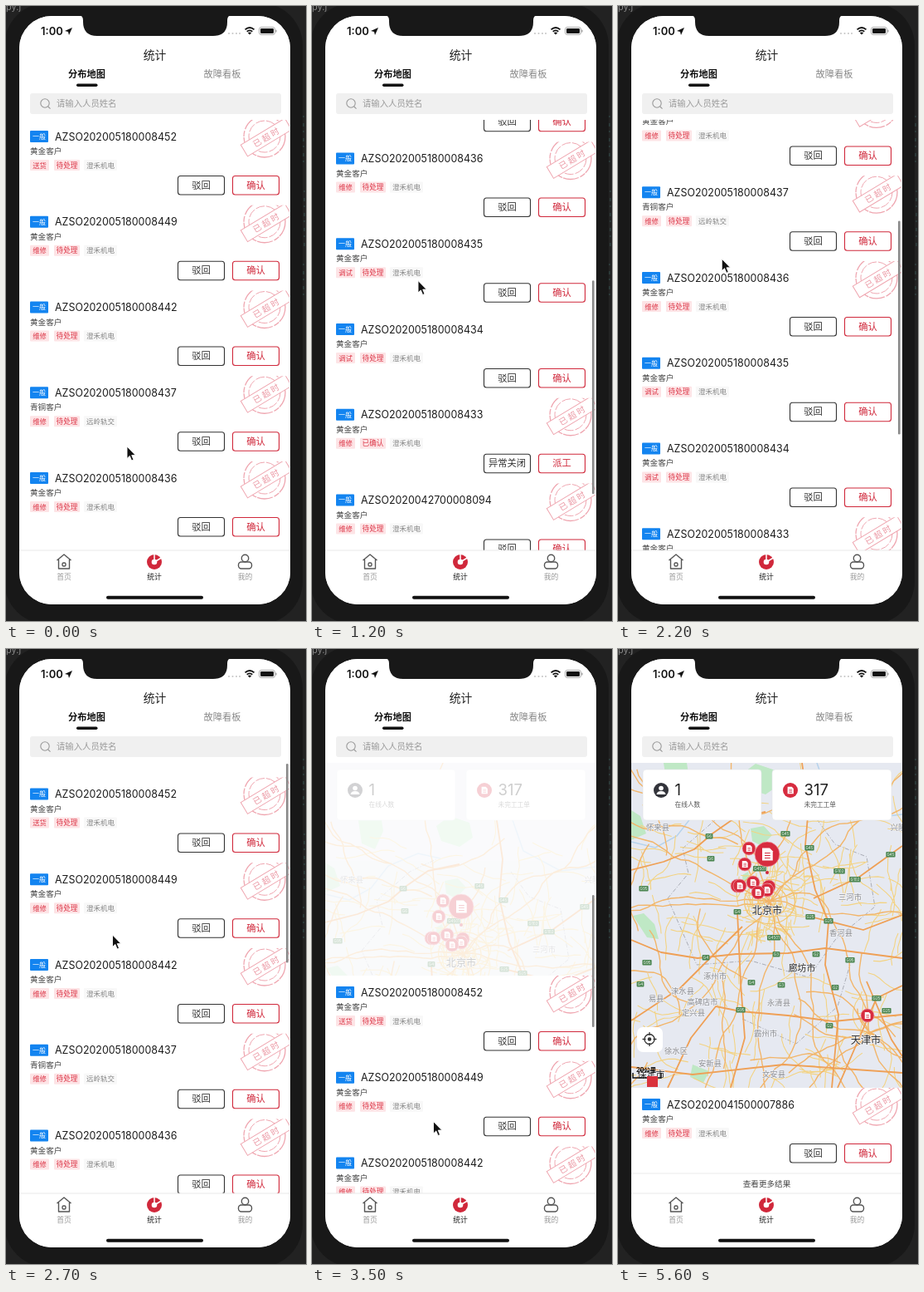
Animation of 362x740 px, one loop 5700 ms. Source, as an HTML page:

```html
<!DOCTYPE html>
<html lang="zh-CN">
<head>
<meta charset="utf-8">
<title>统计</title>
<style>
  html, body { margin: 0; width: 100%; height: 100%; overflow: hidden; background: #1d1d1d; }
  svg { display: block; width: 362px; height: 740px; font-family: Inter, "Noto Sans CJK SC", "Noto Sans CJK", sans-serif; }
</style>
</head>
<body>
<svg id="stage" viewBox="0 0 362 740"></svg>
<script>
const RED = '#d0283b', ROW = 102.75, LIST_TOP = 137, VIEW = 518;

// ---- drawing helpers: every one returns SVG markup ----
const text = (x, cy, size, str, fill = '#222', more = '') =>
  `<text x="${x}" y="${cy + size * .37}" font-size="${size}" fill="${fill}" ${more}>${str}</text>`;
const MID = 'text-anchor="middle"';
const rect = (x, y, w, h, fill, r = 0, more = '') =>
  `<rect x="${x}" y="${y}" width="${w}" height="${h}" rx="${r}" fill="${fill}" ${more}/>`;
const disc = (x, y, r, fill, more = '') => `<circle cx="${x}" cy="${y}" r="${r}" fill="${fill}" ${more}/>`;
const line = (d, stroke, w = 1, more = '') =>
  `<path d="${d}" fill="none" stroke="${stroke}" stroke-width="${w}" ${more}/>`;
const shape = (d, fill) => `<path d="${d}" fill="${fill}"/>`;
const clip = (id, x, y, w, h, r = 0) => `<clipPath id="${id}">${rect(x, y, w, h, '#000', r)}</clipPath>`;

let seed = 11;
const rnd = () => (seed = (seed * 16807) % 2147483647) / 2147483647;

// ---- order list ----
const orders = [
  ['05180008452', '送货'], ['05180008449'], ['05180008442'],
  ['05180008437', '维修', '青铜客户', '远岭轨交'], ['05180008436'],
  ['05180008435', '调试'], ['05180008434', '调试'], ['05180008433'],
  ['042700008094'], ['041500007886']
];

const stamp = () => `<g clip-path="url(#stampBox)"><g fill="none" stroke="#efa6b0">
  <circle cx="312" cy="20" r="25" stroke-width="1.3" stroke-dasharray="19 1 7 2"/>
  <circle cx="312" cy="20" r="19" stroke-dasharray="11 2"/></g>
  <g transform="translate(314 21) rotate(-31)">
  ${rect(-31, -8, 62, 16, '#fff', 0, 'stroke="#efa6b0"')}
  ${text(1, 0, 10, '已超时', '#eb96a2', MID + ' letter-spacing="2.5"')}</g></g>`;

const button = (x, str, color) => rect(x + .5, 67.5, 56, 22.5, '#fff', 3, `stroke="${color}" stroke-width="1.1"`)
  + text(x + 28.5, 78.5, 11.3, str, color, MID);

function order(i) {
  const [id, job = '维修', client = '黄金客户', firm = '澄禾机电'] = orders[i];
  const confirmed = i === 7;
  return (i === 5 || i === 6 ? '' : stamp())
    + rect(29, 13, 22, 14, '#1384f0', 1) + text(40, 20, 8, '一般', '#fff', MID)
    + text(59, 20, 12.45, 'AZSO2020' + id, '#1c1c1c')
    + text(29, 37.5, 9.6, client, '#444')
    + rect(29, 48, 23, 13, '#fde4e6', 1) + text(40.5, 54.5, 8.4, job, '#dc3546', MID)
    + rect(58, 48, 31, 13, '#fde4e6', 1) + text(73.5, 54.5, 8.6, confirmed ? '已确认' : '待处理', '#dc3546', MID)
    + rect(94, 48, 40, 13, '#f8f8f8', 1) + text(114, 54.5, 8.5, firm, '#858585', MID)
    + button(207, confirmed ? '异常关闭' : '驳回', '#333') + button(273, confirmed ? '派工' : '确认', RED);
}

// ---- map ----
function wander(x, y, angle, steps, stride) {
  let d = `M${x.toFixed(1)} ${y.toFixed(1)}`;
  for (let i = 0; i < steps; i++) {
    angle += (rnd() - .5) * .7;
    x += Math.cos(angle) * stride;
    y += Math.sin(angle) * stride;
    d += `L${x.toFixed(1)} ${y.toFixed(1)}`;
  }
  return d;
}
const compass = () => Math.floor(rnd() * 4) * Math.PI / 2 + .1;

function roads() {
  let minor = '', second = '', rings = '';
  for (let i = 0; i < 150; i++) minor += wander(16 + rnd() * 327, 170 + rnd() * 370, compass(), 4 + rnd() * 5, 8);
  for (let i = 0; i < 90; i++) minor += wander(140 + rnd() * 85, 265 + rnd() * 80, compass(), 4, 5);
  for (let i = 0; i < 14; i++) second += wander(183, 304, i * Math.PI / 7 + .15, 26, 10);
  for (let i = 0; i < 9; i++) second += wander(303, 462, i * Math.PI / 4.5, 11, 9);
  for (let i = 0; i < 16; i++) second += wander(16 + rnd() * 327, 190 + rnd() * 340, compass(), 14, 8);
  for (const r of [7, 13, 20, 29])
    rings += `<ellipse cx="183" cy="304" rx="${r * 1.05}" ry="${r * .92}" fill="none" stroke="#f3c670" stroke-width="1.3"/>`;
  const trunk = 'M16 266L55 256L92 241L114 222L140 204L178 196M16 350L52 365L96 372L143 367L205 366L250 360L343 372'
    + 'M222 137L230 190L226 236L238 290L254 328L250 380L266 440L258 528M343 237L290 275L236 300'
    + 'M16 447L75 408L112 371L150 334M60 528L88 468L118 430L148 436L205 441L260 448L343 440'
    + 'M343 405L312 420L285 482L265 528M136 528L153 468L148 402L144 316M16 503L90 512L200 500L343 510'
    + 'M343 320L296 338L232 322M300 400L330 470L343 490';
  return line(minor, '#f3d383', 1.1) + line(second, '#f2b56a', 1.4) + rings
    + line(trunk, '#efa056', 1.8, 'stroke-linejoin="round"');
}

const docIcon = (x, y, k) => `<g transform="translate(${x} ${y}) scale(${k})">
  ${shape('M-4 -5H2L4.5 -2.5V5H-4Z', '#fff')}${line('M-2 -1H2.5M-2 1H2.5M-2 3H2.5', RED, .8)}</g>`;
const pin = (x, y, r = 8) => disc(x, y, r, '#d72c3f', 'stroke="#ef9aa4" stroke-width=".7"') + docIcon(x, y, r / 10);

const towns = [['怀来县', 48, 215], ['兴隆', 338, 215], ['三河市', 280, 299], ['香河县', 269, 342], ['涿州市', 117, 394],
  ['涞水县', 78, 412], ['易县', 46, 421], ['高碑店市', 102, 425], ['定兴县', 91, 438], ['永清县', 194, 426],
  ['霸州市', 178, 463], ['徐水区', 70, 484], ['安新县', 111, 499], ['文安县', 188, 512]];
const cities = [['北京市', 180, 314, 12.2], ['廊坊市', 222, 384, 10.8], ['天津市', 299, 470, 12.2], ['保定市', 40, 512, 11]];
const shields = { G6: [110, 225, 112, 252], G45: [231, 239, 202, 222, 329, 247], G95: [31, 288, 280, 374, 148, 434, 35, 377],
  G102: [286, 277, 267, 267], G4501: [171, 264, 188, 347], G25: [254, 327, 232, 322, 312, 420, 324, 435],
  G4: [144, 316, 106, 371, 27, 403, 161, 401], G3: [191, 367, 197, 404], G2: [239, 367, 262, 407, 255, 453] };

function land() {
  let out = rect(0, 50, 362, 560, '#e6e9f1')
    + shape('M150 150L166 138L190 146L194 164L178 175L156 168ZM55 137H83L86 156L76 178L60 171ZM16 194L27 201L34 222L16 230ZM18 321L31 318L44 331L49 349L35 347ZM160 216L176 213L186 224L173 237L162 231ZM90 500L110 508L103 522L87 515ZM150 272L157 268L160 280L151 287Z', '#bfe8c5')
    + line('M16 232L45 239L71 225L92 198L128 183L155 189M240 137L255 180L300 204L343 199', '#b6d3ec', 1.5)
    + line('M60 300L85 270L78 240L118 205L150 190M240 205L262 235L300 250L310 310L262 350L230 395L160 375L95 380L60 300M150 445L215 475L265 430L280 380', '#a9acb5', 1, 'stroke-dasharray="5 2 1 2"')
    + roads();
  for (const [name, at] of Object.entries(shields))
    for (let i = 0; i < at.length; i += 2) {
      const w = 4 + name.length * 2.4;
      out += rect(at[i] - w / 2, at[i + 1] - 3, w, 6.5, '#4a8550', 1) + text(at[i], at[i + 1], 4.6, name, '#fff', MID);
    }
  const halo = MID + ' paint-order="stroke" stroke="#f0f1f5" stroke-width="1.4"';
  for (const [name, x, y] of towns) out += text(x, y, 9.3, name, '#8b8d92', halo);
  for (const [name, x, y, size] of cities) out += text(x, y, size, name, '#2b2b2b', halo + ' font-weight="500"');
  for (const [x, y] of [[158, 240], [153, 259], [144, 285], [147, 285], [182, 286], [163, 281], [180, 290], [169, 293], [301, 441]])
    out += pin(x, y);
  return out + disc(180, 269, 2, RED) + pin(180, 247, 15);
}

const card = (x, w, n, label, icon) => rect(x, 145, w, 61, '#fff', 4, 'stroke="#e1e3e8" stroke-width=".6"') + icon
  + text(x + 38.5, 169.5, 18.5, n) + text(x + 38.5, 187.5, 7.7, label, '#555');

const overlay = card(30, 143, '1', '在线人数', disc(52, 170, 9, '#33343b') + disc(52, 167.5, 2.8, '#fff') + shape('M46.5 175Q47 171 52 171T57.5 175Z', '#fff'))
  + card(186, 144, '317', '未完工工单', disc(208, 170, 9, '#d72c3f') + docIcon(208, 170, .85))
  + rect(23, 455, 31, 30, '#fff', 7)
  + `<g fill="none" stroke="#333" stroke-width="1.3"><circle cx="38" cy="469.5" r="6"/><path d="M38 461V465M38 474V478M29.5 469.5H33.5M42.5 469.5H46.5"/></g>` + disc(38, 469.5, 2.3, '#333');

const scaleBar = text(22, 506.5, 7.3, '20公里', '#111', 'font-weight="700"')
  + line('M18 510V516H52V510', '#111', 1.5) + rect(35, 514, 13, 13, '#d9323c');

// ---- fixed chrome ----
const header = rect(16, 12, 327, 125, '#fff')
  + text(42, 30, 13, '1:00', '#111', 'font-weight="600"') + shape('M80 26L76 35L75 31L71 30Z', '#111')
  + [269, 273.5, 278, 282].map(x => disc(x, 33, 1, '#c4c4c4')).join('')
  + line('M288.5 28.4Q294 23.5 299.5 28.4M290.7 30.8Q294 28 297.3 30.8', '#111', 1.8) + shape('M291.8 32.2Q294 30.7 296.2 32.2L294 34.6Z', '#111')
  + rect(305.5, 25.5, 19, 9, 'none', 2.5, 'stroke="#999" stroke-width=".8"') + rect(307, 27, 16, 6, '#111', 1.3) + rect(325.4, 28.5, 1.2, 3, '#999', .6)
  + text(179.5, 59, 13.8, '统计', '#222', MID + ' font-weight="500"')
  + text(97.5, 81.5, 11.2, '分布地图', '#111', MID + ' font-weight="700"') + rect(85, 93.5, 25.5, 3.5, '#111', 1.7)
  + text(261, 81.5, 11.2, '故障看板', '#888', MID)
  + rect(29, 105, 303, 25, '#f0f0f0', 3) + disc(47, 117, 5.2, 'none', 'stroke="#999" stroke-width="1.1"') + line('M50.8 121L53.5 123.7', '#999', 1.1)
  + text(61, 117.5, 10.35, '请输入人员姓名', '#9b9b9b');

const tabBar = rect(16, 655, 327, 66, '#fff') + line('M16 655H343', '#e4e4e4', .8)
  + `<g fill="none" stroke="#555" stroke-width="1.4" stroke-linejoin="round"><path d="M61.5 667L70 660L78.5 667M63.5 666V677H76.5V666"/><rect x="68" y="670" width="4" height="4" rx="1.5"/>
     <circle cx="288.5" cy="664.5" r="4.2"/><rect x="280.5" y="669" width="16" height="8" rx="3.5"/></g>`
  + disc(179, 669, 9, RED) + disc(179, 669, 3.3, '#fff') + line('M179 669V659M179 669L187.5 664', '#fff', 1.5)
  + text(70, 687, 8.8, '首页', '#999', MID) + text(179, 687, 8.8, '统计', '#222', MID) + text(288.5, 687, 8.8, '我的', '#999', MID)
  + rect(121, 709.8, 117, 4, '#111', 2);

const stage = document.getElementById('stage');
stage.innerHTML = `<defs>${clip('screen', 16, 12, 327, 708, 39)}${clip('body', 16, 137, 327, 518)}${clip('stampBox', 280, 0, 62, 48)}</defs>
  ${rect(0, 0, 362, 740, '#222')}${rect(-2, -4, 360, 748, '#181818', 52)}
  ${text(0, 1, 11, 'py.j', '#8a8a8a')}
  ${line('M359 132V190M360 222V290M359 310V350', '#35504f', 1, 'stroke-dasharray="2 7 4 5"')}
  <g clip-path="url(#screen)">${rect(16, 12, 327, 708, '#fff')}
    <g clip-path="url(#body)">
      <g id="map"><g id="land">${land()}</g>${overlay}<g id="scale">${scaleBar}</g></g>
      <g id="list">${rect(16, 0, 327, 1036, '#fff')}${orders.map((_, i) => `<g transform="translate(0 ${i * ROW})">${order(i)}</g>`).join('')}</g>
      <g id="single" transform="translate(0 528)">${rect(16, 0, 327, 127, '#fff')}${order(9)}${line('M16 103H343', '#e6e6e6', .8)}${text(179.5, 115, 9.6, '查看更多结果', '#444', MID)}</g>
      ${rect(338, 137, 2.6, 259, '#8a8a8a', 1.3, 'id="bar"')}
    </g>${header}${tabBar}
  </g>
  ${shape('M87 11H273Q267 11 267 17V19Q267 36 250 36H110Q93 36 93 19V17Q93 11 87 11Z', '#181818')}
  <path id="cursor" d="M0 0V14.5L3.3 11.4L5.6 17L8 16L5.7 10.6H10.3Z" fill="#111" stroke="#fff" stroke-width=".9"/>`;

// ---- motion ----
function track(keys, t) {
  let i = 0;
  while (i < keys.length - 1 && keys[i + 1][0] <= t) i++;
  const [t0, a] = keys[i];
  if (i === keys.length - 1) return a;
  const [t1, b] = keys[i + 1], p = (t - t0) / (t1 - t0);
  return a + (b - a) * p * p * (3 - 2 * p);
}

const listY = [[0, 0], [800, -343], [1600, -426], [1800, -426], [2700, 17.5], [3500, 256], [3900, 391]];
const mapFade = [[2700, 0], [3500, .22], [3900, 1]];
const cursorX = [[0, 146], [800, 135], [1600, 121], [2700, 128.5], [3500, 146.5], [4100, 180]];
const cursorY = [[0, 530], [800, 409], [1600, 252], [2700, 344], [3500, 568.5], [4100, 765]];

function set(id, attrs) {
  const node = document.getElementById(id);
  for (const k in attrs) node.setAttribute(k, attrs[k]);
}

const start = performance.now();
function frame() {
  const t = Math.floor((performance.now() - start) % 5700 / 100) * 100;
  const y = track(listY, t), folded = t >= 3900;
  const stretch = Math.min(98, Math.max(0, y)), panel = Math.max(0, y - 98);
  set('list', { transform: `translate(0 ${LIST_TOP + y})`, visibility: folded ? 'hidden' : 'visible' });
  set('single', { visibility: folded ? 'visible' : 'hidden' });
  set('bar', { y: LIST_TOP + panel + Math.max(0, -y) * VIEW / 1036 + 1, height: 257 - stretch, opacity: t > 0 && !folded ? 1 : 0 });
  set('map', { opacity: track(mapFade, t) });
  set('land', { transform: `translate(0 ${folded ? 0 : 63})` });
  set('scale', { visibility: folded ? 'visible' : 'hidden' });
  set('cursor', { transform: `translate(${track(cursorX, t)} ${track(cursorY, t)})` });
  requestAnimationFrame(frame);
}
frame();
</script>
</body>
</html>
```
